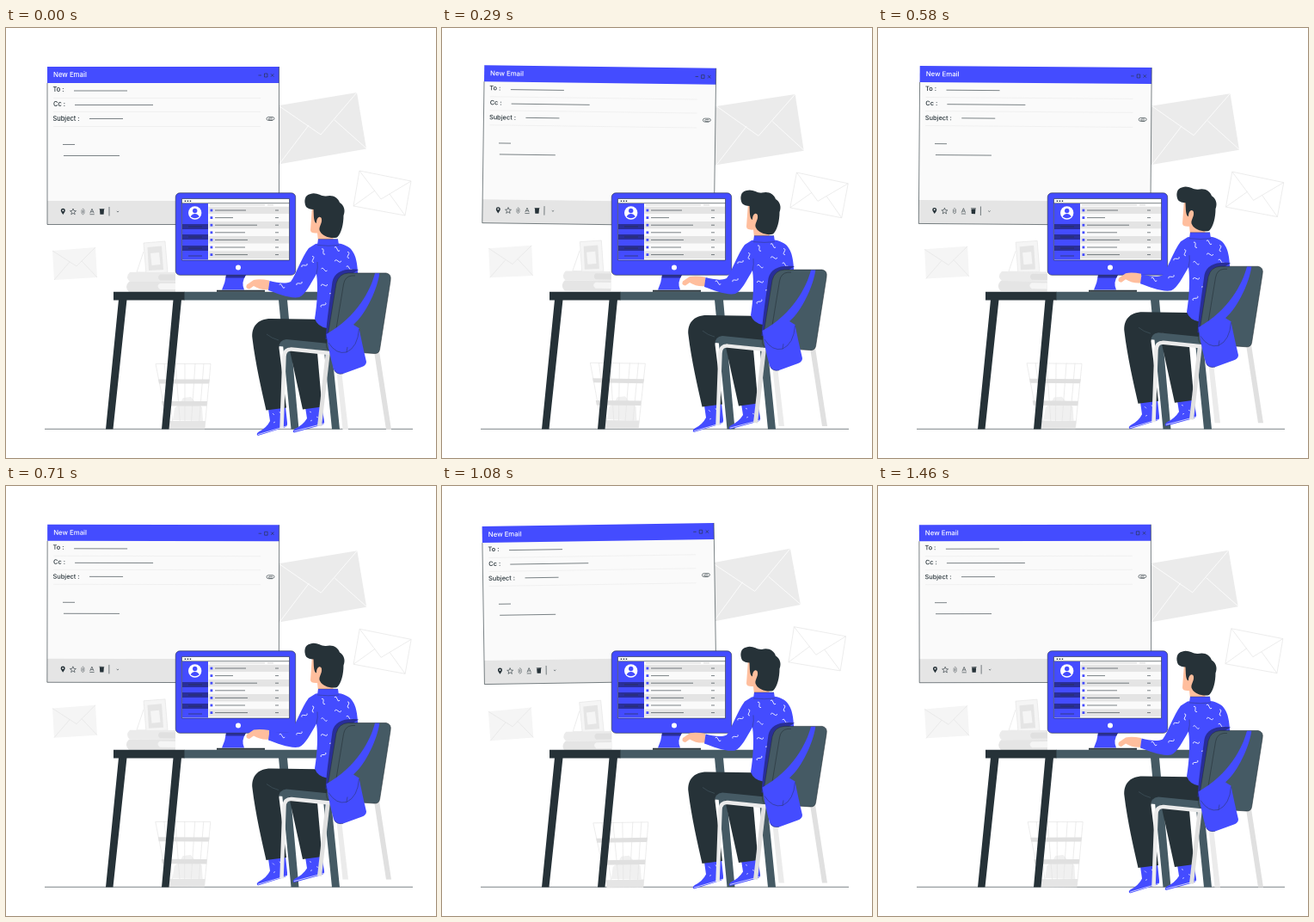
These frames come from a looping animation (500x500 px, 1500 ms). An HTML page:

```html
<!DOCTYPE html>
<html lang="en">
<head>
<meta charset="utf-8">
<title>New Email</title>
<style>
  html, body { margin: 0; width: 100%; height: 100%; overflow: hidden; background: #fff; }
  svg { display: block; width: 100vw; height: 100vh; }
  text { font: 500 7.4px Inter, sans-serif; fill: #263238; }
  .blue { fill: #444cff; }
  .navy { fill: #292e99; }
  .dark { fill: #263238; }
  .slate { fill: #455a64; }
  .skin { fill: #ffbe9d; }
  .grey { fill: #e0e0e0; }
  .silver { fill: #e5e5e5; }
  .pale { fill: #ebebeb; }
  .mist { fill: #f5f5f5; }
  .white { fill: #fff; }
  .line { fill: none; stroke: #263238; stroke-width: .6; }
  .faint { fill: none; stroke: #e4e4e4; stroke-width: .7; }
  .snow { fill: none; stroke: #fff; stroke-width: .8; }
</style>
</head>
<body>
<svg viewBox="0 0 500 500">
  <path class="line" d="M45 466.300H473"/>

  <g id="items">
    <path class="pale" d="M300 93L408 75L419 140.500L311 159.500Z"/>
    <path class="snow" d="M300 93L318 91L366 124L408 75M318 158L352 113M419 140L382 107"/>
    <path class="faint" d="M411 166L471 178L464 218L404 207ZM411 166L436 199L471 178M404 207L429 189M464 218L446 193"/>
    <path class="mist" d="M54 259L104 255L106 290L56 293Z"/>
    <path class="faint" d="M54 259L82 277L104 255M56 293L74 272M106 290L88 271"/>
    <path class="faint" d="M160 260L152 284H164"/>
    <path class="mist" stroke="#e5e5e5" stroke-width=".7" d="M160 250L185 248L188 284L163 286Z"/>
    <path class="silver" d="M164.500 255L181 253.500L183 281L166 282Z"/>
    <path class="mist" d="M168 262L178 261L179.500 275L169.500 276Z"/>
    <path class="pale" d="M144 284H197V295H144Q138 290 144 284Z"/>
    <path class="grey" d="M179 286.500H197V293.500H179Q175 290 179 286.500Z"/>
    <path class="silver" d="M143 295H197V307H143Q137 301 143 295Z"/>
    <path class="mist" d="M179 297H197V304H179Q174 300 179 297Z"/>
    <path fill="#f0f0f0" d="M194 456L196 442L202 437L206 430L215 429L221 436L228 441L229 457Z"/>
    <path class="faint" d="M174 390.500H238L231 466H189ZM184 390L195 466M197 390L203 466M208 390V466M220 390L215 466M230 390L224 466"/>
    <path class="grey" d="M177 408.500H237L236 413.500H178ZM181 434H234L233.500 439.500H182Z"/>
    <path class="silver" d="M187 457H232L231 466H189Z"/>
  </g>

  <g id="mail">
    <path fill="#fafafa" d="M48 45H317.500V228.500H48Z"/>
    <path class="silver" d="M48 201H317.500V228.500H48Z"/>
    <path class="blue" d="M48 45H317.500V64H48Z"/>
    <path class="line" d="M48 64V228.500H317.500V45"/>
    <text x="55" y="57" style="font-size:7.8px;fill:#fff">New Email</text>
    <text x="54.500" y="74">To :</text>
    <text x="55" y="91">Cc :</text>
    <text x="54.500" y="108">Subject :</text>
    <path class="line" d="M293.500 55H297M300.500 53H304V57H300.500ZM308 53.300L311.300 56.700M311.300 53.300L308 56.700"/>
    <path class="faint" stroke-opacity=".65" d="M55 81.500H296M55 97.500H296M55 114.500H296"/>
    <path class="line" d="M79 73H141M80 89.500H171M97 105.500H136M66 135.500H80M67 148.500H132"/>
    <path class="line" d="M310 107.500H305Q303 107.300 303 105.500T305 103.500H310Q312 103.700 312 105.300T310 107H306Q304.500 106 306 105H310"/>
    <path class="dark" fill-rule="evenodd" d="M66.300 217Q63.700 213.500 63.800 212.300A2.500 2.500 0 0 1 68.800 212.300Q68.900 213.500 66.300 217ZM66.300 211.200A1 1 0 0 0 66.300 213.200A1 1 0 0 0 66.300 211.200Z"/>
    <path class="line" d="M78 210L79 212.500L81.500 212.700L79.500 214.300L80.200 216.800L78 215.300L75.800 216.800L76.500 214.300L74.500 212.700L77 212.500Z"/>
    <path class="line" stroke-opacity=".8" d="M88 211.500V215.500Q89.500 218 91 215.500V211.500Q89.500 209.300 88.500 211M89.500 212V215"/>
    <path class="line" d="M97.800 215.300L100 210.300L102.200 215.300M98.700 213.700H101.300M97.500 216.700H102.700"/>
    <path class="dark" d="M109 211H114L113.600 216.700H109.400ZM108.600 210H114.400V210.700H108.600Z"/>
    <path class="line" d="M120 208V218.500M128.800 213L130 214L131.200 213"/>
  </g>

  <path class="slate" d="M207 306.800H374V316.400H207ZM317 316H327L340.500 466.500H331.500ZM364 316H373L388 466.500H379Z"/>
  <path class="dark" d="M125 306.800H207.500V316.400H125ZM131 316H140.500L124.500 466.500H116ZM194.500 316H204L189.500 466.500H181Z"/>

  <path class="blue" d="M256 287H279Q273 296 277 304.500H251Q255 296 256 287Z"/>
  <path class="navy" d="M256 287H279L277.300 290.500H255.500Z"/>
  <path class="dark" d="M245 304.700H301V306.800H245Z"/>
  <rect class="blue" x="197.200" y="191.800" width="139.500" height="95.500" rx="5" stroke="#263238" stroke-width=".6"/>
  <path class="white" d="M204.500 198.500H329.500V270H204.500Z"/>
  <path class="line" d="M204.500 198.500H329.500V270H204.500ZM204.500 203.700H329.500"/>
  <path class="blue" d="M205 204H235V269.600H205Z"/>
  <path class="dark" d="M207.700 200.600h1.500v1.500h-1.500ZM210.700 200.600h1.500v1.500h-1.500ZM213.700 200.600h1.500v1.500h-1.500Z"/>
  <circle class="white" cx="219.700" cy="215" r="7.700"/>
  <circle class="blue" cx="219.700" cy="212.500" r="2.700"/>
  <path class="blue" d="M214.700 219.500Q216 216 219.700 216T224.700 219.500Q219.700 223 214.700 219.500Z"/>
  <g id="menu"></g>
  <path class="grey" d="M237 205.200H301V206.500H237ZM304 205.200H311V206.500H304Z"/>
  <g id="inbox"></g>
  <circle class="white" cx="270" cy="278.500" r="3"/>

  <g id="person">
    <path class="grey" d="M428 376H434L448 467H442Z"/>
    <path class="pale" d="M382 376H387.500L398 467H391.500Z"/>
    <path class="blue" d="M348 441L367 438L370 457Q371 461 366 462L335 470.500Q332 469 336 466Q345 462 350 454ZM305 443L325 440L327 459Q328 464 322 465L293 474Q290 472 294 469.500Q303 465 307 457Z"/>
    <path fill="none" stroke="#c8caff" d="M293 472.700L326 463M335 469L370 459.800"/>
    <path class="snow" stroke-opacity=".8" d="M310 448l2 2M318 446l1 2M311 459l2-1M353 446l2 1M354 457l2-1M361 452l2 1"/>
    <path class="dark" d="M328 366L345 443.500L367.500 440.500L361 366Z"/>
    <path class="slate" d="M317 370Q317 362 325 362H380V377L329 371Z"/>
    <path class="dark" d="M378 339L308 338C292 338 285 348 286.500 361C290 390 297 420 302.500 444.500L326 441.500L317.500 372Q317 363 326 362L376 367Z"/>
    <path fill="none" stroke="#455a64" stroke-width=".6" d="M303 356Q309 361 317 363"/>
    <path fill="none" stroke="#e0e0e0" stroke-width="5" d="M374.500 376L364.500 463"/>
    <path fill="none" stroke="#ebebeb" stroke-width="4.500" d="M320.500 466L323.500 382Q324 373 332 373.500L376 378"/>

    <path class="skin" d="M356 207L354 235Q354 239 362 238.500L363 248H380L384 222Z"/>
    <path class="dark" d="M349 208C346 202 347 194 354 193C361 190.500 366 196 372 195.500C380 193.500 386 197 388 203C393 206 395 212 392.500 218C392.500 228 390 239 385 243.500C378 245.500 368 242 365.500 237C362 232 368 228 367 222C366 218 361 219 361 227C357.500 226 358 218 357.500 211Q352 211 349 208Z"/>
    <path class="skin" d="M306 293.500Q295 291.500 288 293L280 298.500Q278 303 283 303.500L288 300Q296 305 306 304Z"/>
    <path class="blue" d="M360 251C376 248 392 249 400 256C408 264 409 275 410 300L400 346L373 349Q362 347 359 338C362 320 363 300 361 286C354 298 348 310 341 313C331 315 316 309 305 305L306.500 294C315 296 324 298 331 295C337 287 344 266 352 256Z"/>
    <path class="blue" d="M363 245.500H386L387 252.500Q374 254 362 252Z"/>
    <path class="line" stroke-opacity=".6" d="M363 245.500H386M362 252.500Q375 254 387 252.500M361 286Q363 278 362 272"/>
    <g id="squiggles"></g>

    <path class="navy" d="M410 281C394 279 382 283 379.500 295C377 314 373 338 371.500 362H388L399 288Z"/>
    <path class="slate" stroke="#263238" stroke-width=".6" d="M398 285H442Q448.500 286 447 294L434.500 374Q433.500 379 428 378.500L376 375Q372 373 372.700 367L384 297Q387 285.500 398 285Z"/>
    <path class="line" d="M406 288H402Q394 289 392.500 298L381 368"/>
    <path class="blue" d="M429 285.300H434.300C432 303 419 332 404 345L410.500 349Q414 367 419 388Q419 392 414 394L392 402Q384 404 381 397Q375 375 372.500 356C408 336 424 305 429 285.300Z"/>
    <path class="line" stroke-opacity=".7" d="M375 366Q384 380 396 377Q409 371 410.500 350M397 371L396 377M382 398Q384 403 392 402"/>
  </g>
</svg>
<script>
  const $ = id => document.getElementById(id);
  const LOOP = 1500;

  $('menu').innerHTML = [228, 240, 253].map(y =>
    `<path class="navy" d="M205 ${y}h30v6h-30Z"/><path class="line" d="M212 ${y + 3}h16"/>`
  ).join('') + '<path class="line" d="M212 265h16"/>';

  $('inbox').innerHTML = [279, 264, 292, 278, 281, 278, 281].map((end, i) => {
    const y = 212 + i * 8.6;
    return `<path fill="${i % 2 ? '#fafafa' : '#e4e4e4'}" d="M235.500 ${y - 4.300}H329V${y + 4.300}H235.500Z"/>
      <path class="blue" d="M237.500 ${y - 1.400}h2.800v2.800h-2.800Z"/>
      <path class="line" d="M243 ${y}H${end}M313 ${y}h4"/>`;
  }).join('');

  // x, y, angle
  $('squiggles').innerHTML = [
    [369, 260, 40], [385, 257, 15], [398, 264, 60], [357, 269, 60], [370, 281, 0],
    [386, 271, -20], [399, 279, 10], [347, 276, -50], [341, 297, -50], [321, 300, 10],
    [370, 299, -30], [369, 322, -60], [379, 311, 20]
  ].map(([x, y, a]) =>
    `<path class="snow" d="M-3.500 -1Q-2 -3.500 0 0T3.500 1" transform="translate(${x} ${y}) rotate(${a})"/>`
  ).join('');

  function draw(now) {
    const p = now % LOOP / LOOP;
    const sway = 1 - 4 * Math.abs((p + .25) % 1 - .5);
    const lift = Math.abs(1 - 2 * p) * 10 - 10;
    $('mail').setAttribute('transform', `rotate(${sway} 183 137)`);
    $('items').setAttribute('transform', `rotate(${sway} 262 271)`);
    $('person').setAttribute('transform', `translate(0 ${lift})`);
  }

  const start = performance.now();
  (function tick() {
    draw(performance.now() - start);
    requestAnimationFrame(tick);
  })();
</script>
</body>
</html>
```
